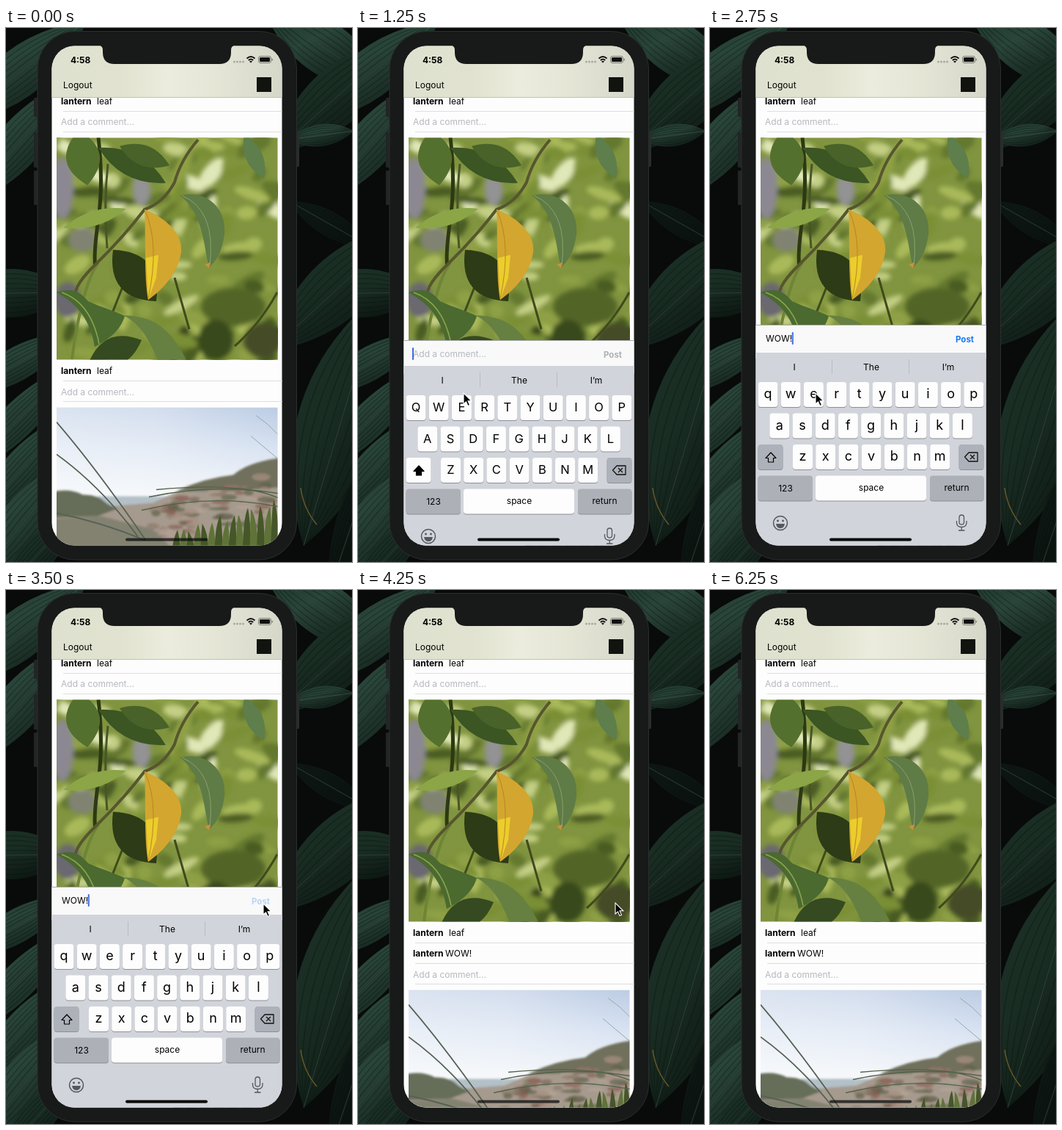
An HTML page for the animation above (6.75 s loop, 472x727 px).

```html
<!DOCTYPE html>
<html lang="en">
<head>
<meta charset="utf-8">
<title>Commenting on a photo feed</title>
<style>
  html, body { margin: 0; width: 100%; height: 100%; overflow: hidden; background: #090d0c; }
  svg { display: block; width: 472px; height: 727px; }
  text { font: 12px Inter, sans-serif; white-space: pre; }
  .b { font-weight: 700; }
  .hint { fill: #b5b8be; }
  .mid { text-anchor: middle; }
  .rule { stroke: #dedee1; stroke-width: 1; }
</style>
</head>
<body>
<svg id="stage" viewBox="0 0 472 727" xmlns="http://www.w3.org/2000/svg"></svg>
<script>
const USER = "lantern";
const HINT = "Add a comment...";
const LOOP = 6750;

let seed = 11;
const random = () => (seed = (seed * 16807) % 2147483647) / 2147483647;
const between = (a, b) => a + random() * (b - a);
const repeat = (n, make) => Array.from({ length: n }, (_, i) => make(i)).join("");

const text = (x, y, label, cls = "", extra = "") =>
  `<text x="${x}" y="${y}" class="${cls}" ${extra}>${label}</text>`;
const rect = (x, y, w, h, fill, r = 0, extra = "") =>
  `<rect x="${x}" y="${y}" width="${w}" height="${h}" rx="${r}" fill="${fill}" ${extra}/>`;
const shape = (d, fill, extra = "") => `<path d="${d}" fill="${fill}" ${extra}/>`;
const line = (d, color, width, extra = "") =>
  `<path d="${d}" fill="none" stroke="${color}" stroke-width="${width}" ${extra}/>`;
const rule = (x, y) => `<path class="rule" d="M${x} ${y}.5H377"/>`;

// Two mirrored arcs around a midrib, with optional veins running lengthwise.
function leaf(x1, y1, x2, y2, bulge, fill, veins = 0) {
  const length = Math.hypot(x2 - x1, y2 - y1);
  const nx = (y1 - y2) / length, ny = (x2 - x1) / length;
  const arc = s => `Q${(x1 + x2) / 2 + nx * bulge * s} ${(y1 + y2) / 2 + ny * bulge * s}`;
  const rib = s => `M${x1} ${y1}${arc(s)} ${x2} ${y2}`;
  return shape(`${rib(1)}${arc(-1)} ${x1} ${y1}`, fill) + (veins
    ? line(repeat(veins, i => rib(2 * (i + 1) / (veins + 1) - 1)), "#06100c", 1.3, 'opacity=".33"') +
      line(rib(0), "#62786b", 1, 'opacity=".4"')
    : "");
}

const backdrop = () => rect(0, 0, 472, 727, "#080b0a") + [
  [-70, 130, 110, -10, 66, "lit"], [-60, 245, 100, 65, 62, "lit"],
  [-75, 362, 90, 360, 66, "dull"], [-60, 500, 90, 415, 46, "lit"],
  [-60, 610, 95, 455, 48, "lit"], [-50, 680, 95, 520, 52, "lit"],
  [-50, 765, 95, 585, 66, "lit"], [-10, 775, 95, 660, 46, "dull"],
  [350, -30, 520, 85, 72, "lit"], [365, 170, 540, 15, 78, "dull"],
  [385, 152, 475, 140, 30, "lit"], [385, 235, 500, 300, 34, "dark"],
  [360, 440, 550, 265, 84, "dull"], [406, 705, 510, 360, 118, "dull"],
  [440, 770, 510, 560, 44, "dark"]
].map(([x1, y1, x2, y2, bulge, tone]) => leaf(x1, y1, x2, y2, bulge, `url(#${tone})`, 9)).join("") +
  line("M402 626Q406 655 424 676", "#69552a", 1.6);

function foliage() {
  const tones = ["#e0e7b8", "#c3cf84", "#a9b95a", "#8ea044", "#7a8f36", "#64782e", "#485c22", "#34431a"];
  const blobs = repeat(130, () => {
    const x = between(65, 375), y = between(145, 455), a = between(-80, 50);
    const shade = random() * .72 + (y - 145) / 310 * .28;
    return `<ellipse cx="${x}" cy="${y}" rx="${between(10, 28)}" ry="${between(5, 11)}" fill="${tones[Math.floor(shade * 8)]}" transform="rotate(${a} ${x} ${y})"/>`;
  });
  const soft = `<g filter="url(#soft)">${blobs}
    <ellipse cx="77" cy="218" rx="15" ry="42" fill="#8b8891"/>
    <ellipse cx="84" cy="370" rx="18" ry="24" fill="#6b676f"/>
    <ellipse cx="105" cy="288" rx="20" ry="17" fill="#808371"/>
    <ellipse cx="185" cy="220" rx="12" ry="22" fill="#939294"/>
    <ellipse cx="310" cy="380" rx="44" ry="26" fill="#526526"/>
    <ellipse cx="286" cy="425" rx="24" ry="28" fill="#394a1a"/>
    <ellipse cx="350" cy="425" rx="26" ry="24" fill="#454b26"/></g>`;
  return `<g clip-path="url(#photo)">${rect(69, 149, 302, 303, "#81943f")}${soft}` +
    line("M126 149Q133 210 126 260T122 325", "#2c3912", 5) +
    line("M139 185Q133 240 138 300", "#485626", 3) +
    line("M90 451Q94 415 104 375T126 320", "#6f8436", 4) +
    line("M262 152Q238 180 230 210Q215 238 189 247Q160 285 122 322T99 370", "#57562e", 4) +
    line("M370 360Q345 405 312 433M160 350L145 388M230 340L250 410", "#3f4b1c", 3) +
    leaf(99, 139, 111, 214, 46, "#54702e") +
    leaf(126, 163, 218, 211, 31, "#3b5523") +
    leaf(155, 161, 223, 187, 28, "#48622a") +
    leaf(325, 145, 352, 205, 23, "#5e7e4b") +
    leaf(78, 272, 164, 246, 20, "#8ba547") +
    leaf(146, 302, 205, 372, 50, "#2d3b16") +
    shape("M237 228C275 219 301 247 298 280C295 306 285 319 277 326C270 301 270 252 237 228", "#5f7b46") +
    line("M240 228Q287 248 278 323", "#8ba070", 1) +
    shape("M271 322L279 319 277 327Z", "#ce903b") +
    shape("M189 247C215 257 241 278 239 304C235 336 211 358 194 370C188 340 191 285 189 247", "#d3a62f") +
    shape("M191 313L208 309 205 340 194 370Z", "#ebcd2b") +
    line("M190 249Q210 295 194 368", "#b8842a", 1) +
    shape("M69 360C90 353 100 358 112 372C130 380 150 386 162 392C156 414 137 425 121 434C116 405 104 379 69 360", "#4b6a30") +
    line("M76 360Q116 374 127 430", "#8da64e", 1.5) +
    shape("M160 391C200 393 222 405 246 452L207 452C196 428 186 404 160 391", "#668041") +
    leaf(113, 455, 185, 425, 38, "#354a20") + "</g>";
}

function dunes() {
  const spikes = repeat(15, i => {
    const x = 232 + i * 9.6, tip = 176 - i * 2.9 - between(0, 12), lean = between(-4, 4);
    return shape(`M${x - 5} 192Q${x - 4} ${tip + 12} ${x + lean} ${tip}Q${x + 5} ${tip + 12} ${x + 6} 192Z`,
      i % 2 ? "#5f7338" : "#455728");
  });
  const earth = ["#8f7a6c", "#61624c", "#b3a295", "#8c5f54", "#a78e80"];
  const brush = repeat(80, () => {
    const x = between(195, 371), top = 132 - (x - 195) * .25;
    const fill = earth[Math.floor(random() * earth.length)];
    return `<ellipse cx="${x}" cy="${between(top, 178)}" rx="${between(5, 14)}" ry="${between(2, 5)}" fill="${fill}" opacity=".7"/>`;
  });
  return `<g clip-path="url(#lower)">${rect(69, 0, 302, 192, "url(#sky)")}${rect(69, 0, 302, 130, "url(#glow)")}
    <g filter="url(#haze)">${rect(125, 121, 120, 20, "#b3c0c8")}
    ${shape("M60 140L150 134 200 130 240 112 270 100 320 90 380 74V200H60Z", "#a59a8d")}
    ${shape("M60 116Q85 109 105 119Q125 118 138 131L152 138 125 148 60 150Z", "#666d59")}
    ${shape("M232 114Q270 96 310 92Q330 74 380 68V108L310 114Z", "#6f705c")}${brush}
    ${shape("M60 152L130 148 200 166 235 200H60Z", "#838271")}</g>${spikes}` +
    line("M69 20Q125 85 190 180M69 64Q130 108 180 176M69 144Q130 156 190 181", "#566254", 1.8) +
    line("M195 122Q285 103 371 117M205 112Q320 101 371 123M185 140Q280 117 371 135", "#53634b", 1.4) +
    line("M341 11Q359 23 371 37M334 39L371 70", "#9aa5a8", 1) + "</g>";
}

const row = (y, label) => text(75, y, USER, "b") + label;

const feed = () => `
  ${rect(62, 24, 315, 681, "#fdfdfd")}
  ${row(104, text(124, 104, "leaf"))}${rule(78, 113)}
  ${text(75, 132, HINT, "hint")}${rule(78, 141)}
  ${foliage()}
  ${row(471, text(124, 471, "leaf"))}${rule(78, 480)}
  <g id="comment">${row(499, text(119, 499, "WOW!"))}${rule(78, 508)}</g>
  <g id="below">${text(75, 500, HINT, "hint")}${rule(78, 508)}
    <g transform="translate(0 516.5)">${dunes()}</g></g>`;

const PITCH = 31.2;
const cap = (x, y, w, fill, id = "") =>
  rect(x, y + 1, w, 34, "#8d9096", 4) + rect(x, y, w, 34, fill, 4, id && `id="${id}"`);
const letters = (keys, x, y) => [...keys].map((k, i) =>
  cap(x + i * PITCH, y, 27, "#fdfdfe") +
  text(x + 13.5 + i * PITCH, y + 22, k, "mid key")).join("");

const keyboard = () => `
  <g id="bar">${rect(62, 404, 315, 46, "#f9f9fa")}
    <path d="M62 404.5H377" stroke="#a9abae"/>
    ${text(75, 427, HINT, "hint", 'id="hint"')}
    ${text(76, 427, "", "", 'id="typed"')}
    ${rect(74, 414, 2, 17, "#3f6be0", 1, 'id="caret"')}
    ${text(335, 428, "Post", "b", 'id="post" style="font-size:11.5px"')}</g>
  <g id="keys">${rect(62, 442, 315, 285, "#d1d4da")}
    <path d="M166.5 451v20M271.5 451v20" stroke="#b9bcc2"/>
    ${[115, 220, 325].map(x => text(x, 466, "", "mid word")).join("")}
    ${letters("qwertyuiop", 65.5, 482)}
    ${letters("asdfghjkl", 81.3, 524.5)}
    ${letters("zxcvbnm", 113, 567)}
    ${cap(65.5, 567, 34, "#adb1b9", "shift")}
    <path id="arrow" d="M83 578L90 585.5H86.5V591H79.5V585.5H76Z" stroke="#000" stroke-width="1.2" stroke-linejoin="round"/>
    ${cap(339.5, 567, 34, "#adb1b9")}
    ${line("M353 578H365V590H353L347.5 584ZM355 581L361 587M361 581L355 587", "#111", 1.3, 'stroke-linejoin="round"')}
    ${cap(65.5, 609.5, 74.5, "#adb0b7")}${cap(144, 609.5, 151, "#fdfdfe")}${cap(300, 609.5, 73.5, "#adb0b7")}
    ${text(103, 631, "123", "mid")}${text(220, 630, "space", "mid")}${text(336.5, 630, "return", "mid")}
    <circle cx="96" cy="674" r="9.5" fill="none" stroke="#54575c" stroke-width="1.5"/>
    <circle cx="92.5" cy="671" r="1.4" fill="#54575c"/><circle cx="99.5" cy="671" r="1.4" fill="#54575c"/>
    ${shape("M90 675H102Q101 681 96 681T90 675", "#54575c")}
    ${rect(340, 663, 6.5, 13, "none", 3.2, 'stroke="#54575c" stroke-width="1.3"')}
    ${line("M336.5 671V674Q337 679.5 343.2 679.5T350 674V671M343.2 680V684M339 684H347.5", "#54575c", 1.3)}
  </g>`;

const navigation = () => `
  ${rect(62, 24, 315, 70, "url(#nav)")}
  <path d="M62 94.5H377" stroke="#bfc1b8"/>
  ${text(88, 48, "4:58", "b")}${text(78, 82, "Logout")}
  ${rect(342, 67, 20, 20, "#11130f")}
  ${repeat(4, i => `<circle cx="${311.5 + i * 4}" cy="46" r="1.5" fill="#a8aaa1"/>`)}
  ${line("M328.5 41.5Q334 36.5 339.5 41.5M330.8 44Q334 41 337.2 44", "#111", 1.9)}
  ${shape("M332 45.5Q334 44 336 45.5L334 47.5Z", "#111")}
  ${rect(344.5, 38.5, 17, 9, "none", 2.5, 'stroke="#777970"')}${rect(346, 40, 14, 6, "#111", 1.2)}
  ${rect(362.8, 41.5, 1.2, 3, "#777970", .6)}`;

const phone = () =>
  [[95, 26], [142, 48], [194, 47]].map(([y, h]) => rect(38, y, 6, h, "#222525", 1.5)).join("") +
  rect(395, 142, 5, 47, "#292c2c", 1.5) +
  rect(43, 4.5, 353.5, 719.5, "#181a1a", 51, 'stroke="#2b2e2e"') +
  `<g clip-path="url(#screen)">${feed()}<g id="entry">${keyboard()}</g>${navigation()}
   ${rect(163, 694.5, 112, 4, "#080909", 2, 'id="home"')}</g>` +
  shape("M126 23.5Q132 24 132 30V33Q132 49 148 49H291Q307 49 307 33V30Q307 24 313 23.5Z", "#181a1a");

const gradient = (id, stops, direction = "") =>
  `<linearGradient id="${id}" ${direction}>${stops.map(([offset, color, opacity = 1]) =>
    `<stop offset="${offset}" stop-color="${color}" stop-opacity="${opacity}"/>`).join("")}</linearGradient>`;
const blur = (id, size) => `<filter id="${id}"><feGaussianBlur stdDeviation="${size}"/></filter>`;
const clip = (id, ...box) => `<clipPath id="${id}">${rect(...box)}</clipPath>`;

const stage = document.getElementById("stage");
stage.innerHTML = `<defs>
  ${gradient("lit", [[0, "#1a3027"], [.45, "#2a4539"], [1, "#0e1a15"]], 'x2=".7" y2="1"')}
  ${gradient("dull", [[0, "#1c3127"], [.5, "#192d23"], [1, "#0c1511"]], 'x2=".7" y2="1"')}
  ${gradient("dark", [[0, "#101a16"], [1, "#0a110e"]], 'x2=".7" y2="1"')}
  ${gradient("sky", [[0, "#bccce4"], [.3, "#d9e3f2"], [.62, "#f1f4f8"]], 'x2="0" y2="1"')}
  ${gradient("glow", [[0, "#fff", .45], [.45, "#fff", .35], [1, "#fff", 0]])}
  ${gradient("nav", [[0, "#dfe1d0"], [.3, "#e1e3d0"], [.5, "#ebecdd"], [.7, "#e5e6d6"], [1, "#d5d7c9"]])}
  ${blur("soft", 3)}${blur("haze", 1.8)}
  ${clip("screen", 62.5, 24.5, 314, 680, "#000", 31)}
  ${clip("photo", 69, 149.5, 301.5, 302, "#000")}
  ${clip("lower", 69, 0, 301.5, 192, "#000")}
</defs>${backdrop()}${phone()}
<path id="pointer" d="M0 0V15L3.5 11.8 6 17.5 8.5 16.4 6 10.8H10.8Z" stroke="#fff" stroke-width="1.1"/>`;

const el = id => document.getElementById(id);
const keyLabels = [...document.querySelectorAll(".key")];
const wordLabels = [...document.querySelectorAll(".word")];

// Each step overrides only what changes at its time.
const DEFAULT_WORDS = ["I", "The", "I’m"];
const steps = [
  [0, { pointer: null, open: false, drop: 0, barDrop: 0, typed: "", caret: true, posted: false, post: "#aeb0b4", words: DEFAULT_WORDS }],
  [250, { pointer: [417, 244] }],
  [500, { pointer: [142, 490] }],
  [750, { pointer: [144, 503] }],
  [1000, { pointer: [144, 497] }],
  [1250, { open: true, drop: 18, barDrop: 21 }],
  [1500, { drop: 0, barDrop: 0 }],
  [1750, { caret: false }],
  [2000, { typed: "WO", caret: true, post: "#167bf4", words: ["“W", "We", 'Wh<tspan fill="#888b91">a</tspan>'] }],
  [2250, { typed: "WOW", words: ["“WO", "Wow", "Would"] }],
  [2500, { words: ["“WOW”", "Wow", "Wowed"] }],
  [2750, { typed: "WOW!", words: DEFAULT_WORDS }],
  [3000, { pointer: [297, 422] }],
  [3250, { pointer: [330, 427], caret: false }],
  [3500, { pointer: [351, 427], caret: true, post: "#b8d5f7" }],
  [3750, { pointer: [351, 426], drop: 263, barDrop: 263, typed: "", caret: false, post: "#aeb0b4", posted: true }],
  [4000, { open: false }],
  [5500, { pointer: null }]
];

const show = (node, visible) => node.setAttribute("display", visible ? "inline" : "none");
const shift = (node, x, y) => node.setAttribute("transform", `translate(${x} ${y})`);

function render(state) {
  const upper = state.typed === "";
  show(el("pointer"), state.pointer);
  if (state.pointer) shift(el("pointer"), ...state.pointer);

  show(el("comment"), state.posted);
  shift(el("below"), 0, state.posted ? 28 : 0);

  show(el("entry"), state.open);
  shift(el("keys"), 0, state.drop);
  shift(el("bar"), 0, state.barDrop);
  show(el("hint"), upper);
  el("typed").textContent = state.typed;
  show(el("caret"), state.caret);
  el("caret").setAttribute("x", upper ? 74 : 75.5 + el("typed").getComputedTextLength());
  el("post").setAttribute("fill", state.post);
  wordLabels.forEach((label, i) => { label.innerHTML = state.words[i]; });

  for (const label of keyLabels) {
    label.textContent = upper ? label.textContent.toUpperCase() : label.textContent.toLowerCase();
    label.style.fontSize = upper ? "16.5px" : "18px";
  }
  el("shift").setAttribute("fill", upper ? "#fdfdfe" : "#adb1b9");
  el("arrow").setAttribute("fill", upper ? "#000" : "none");
  el("home").setAttribute("opacity", state.open ? 1 : .72);
}

const began = performance.now();
let shown = -1;
function tick() {
  const time = (performance.now() - began) % LOOP;
  const count = steps.filter(([start]) => start <= time).length;
  if (count !== shown) {
    shown = count;
    render(Object.assign({}, ...steps.slice(0, count).map(([, change]) => change)));
  }
  requestAnimationFrame(tick);
}
tick();
</script>
</body>
</html>
```
